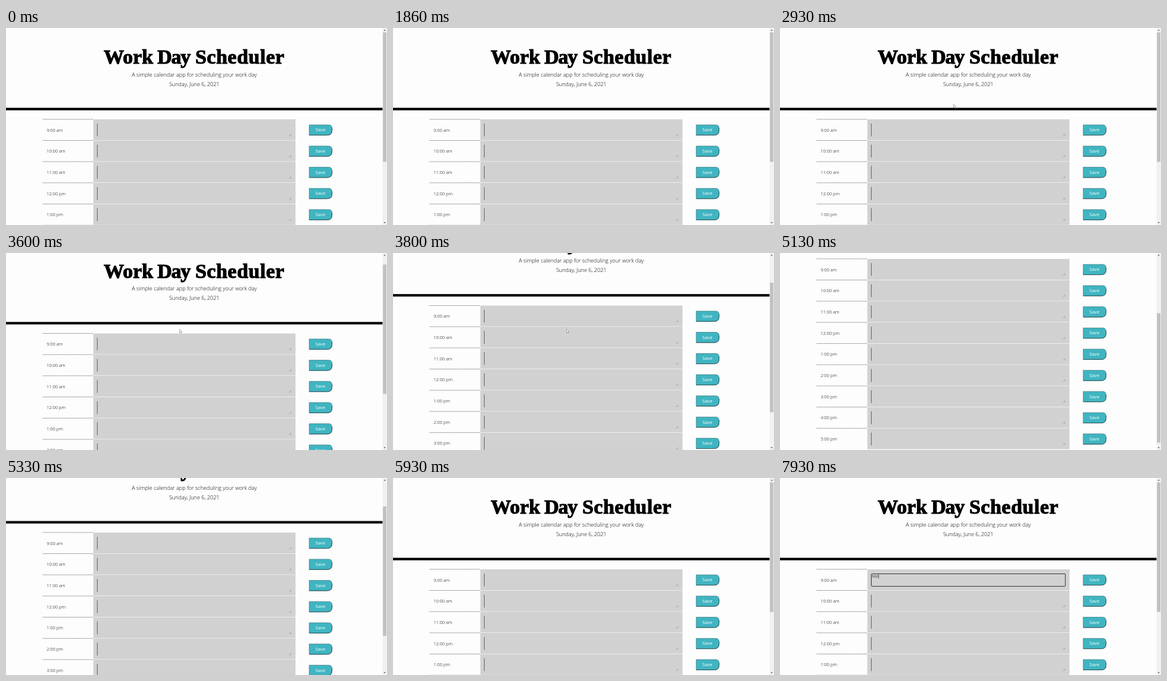
Write an HTML page that moves like this. It is 640 by 332 pixels and loops after 8000 ms.

```html
<!DOCTYPE html>
<html lang="en">
<head>
<meta charset="utf-8">
<title>Work Day Scheduler</title>
<style>
  html, body { margin: 0; width: 100%; height: 100%; overflow: hidden; background: #fdfdfd; }
  svg { display: block; width: 100vw; height: 100vh; }
  text { font-family: "Open Sans", "Noto Sans", sans-serif; font-weight: 300; fill: #000; }
  .title text { font: bold 34px "Liberation Serif", "Times New Roman", serif; stroke: #000; stroke-width: 1.1; text-anchor: middle; }
  .lead { font-size: 9.1px; text-anchor: middle; }
  .hour { font-size: 7.5px; }
  .save { font-size: 7.7px; font-weight: 400; fill: #fff; text-anchor: middle; }
  .typed { font-size: 7.5px; }
</style>
</head>
<body>
<svg viewBox="0 0 640 332" preserveAspectRatio="none">
  <rect width="640" height="332" fill="#fdfdfd"/>
  <g id="page">
    <g class="title">
      <text x="205.7" y="60.3">Work</text>
      <text x="281.7" y="60.3" letter-spacing="-1.3">Day</text>
      <text x="392.9" y="60.3" letter-spacing="0.5">Scheduler</text>
    </g>
    <text class="lead" x="316.4" y="81.8">A simple calendar app for scheduling your work day</text>
    <text class="lead" x="316.2" y="97.8">Sunday, June 6, 2021</text>
    <rect y="134.5" width="633" height="4.2"/>
    <g id="rows"></g>
    <g id="focus">
      <rect x="153" y="161" width="326.8" height="22" fill="#d1d1d1"/>
      <rect x="153.5" y="161.5" width="325.8" height="21" rx="1.2" fill="none" stroke="#333"/>
      <text class="typed" x="154.6" y="168.2"><tspan id="typed"></tspan></text>
      <path id="caret" d="M0 161.8v7.6" stroke="#222" stroke-width=".7"/>
    </g>
  </g>
  <path id="cursor" d="M0 0v6l1.4-1.2 1 2.1 .9-.4-1-2.1h1.9z" fill="#fff" stroke="#777" stroke-width=".6"/>
  <rect x="632.5" width="7.5" height="332" fill="#f1f1f1"/>
  <rect id="thumb" x="633.2" y="7.4" width="5.8" height="218.2" fill="#c1c1c1"/>
  <path d="M634.4 4.6l1.7-2 1.7 2z" fill="#505050"/>
  <path d="M634.4 327.2l1.7 2 1.7-2z" fill="#505050"/>
</svg>
<script>
const LOOP = 8000, PITCH = 35.7, THUMB_RATIO = 0.653;
const $ = id => document.getElementById(id);

const row = (label, i) => `
  <g transform="translate(0 ${(i * PITCH).toFixed(2)})">
    <rect x="146.7" y="153.9" width="339.6" height="35.8" fill="#d1d1d1"/>
    <path d="M146.7 189.5h339.6" stroke="#fdfdfd"/>
    <path d="M61.5 153.8h85" stroke="#666" stroke-width=".8" stroke-dasharray="1.6 .7"/>
    <text class="hour" x="68.2" y="174.5">${label}</text>
    <path d="M153.4 161v21.6" stroke="#444" stroke-width=".8"/>
    <path d="M475.6 182l3.4-3.4M477.6 182l1.4-1.4" stroke="#858585" stroke-width=".7"/>
    <path d="M509.3 163.2h32.6q5.8 0 5.8 5.8v3.6q0 8-8 8h-30.4z" fill="#40b5c1" stroke="#3a727a" stroke-width=".7"/>
    <path d="M547.7 168.5v4.1q0 8-8 8h-30.4" fill="none" stroke="#20454b" stroke-width=".8"/>
    <text class="save" x="528.2" y="174.4">Save</text>
  </g>`;

$("rows").innerHTML = Array.from({ length: 9 }, (_, i) => {
  const hour = 9 + i;
  return row(`${hour > 12 ? hour - 12 : hour}:00 ${hour < 12 ? "am" : "pm"}`, i);
}).join("");

// Each track lists [time, value]; a value holds until the next time.
const scroll = [
  [0, 0],
  [3460, 2], [3530, 8], [3600, 18.3], [3660, 33], [3730, 49],
  [3800, 65.3], [3860, 90], [3930, 115], [4000, 135], [4060, 144],
  [5200, 134], [5260, 103], [5330, 62], [5400, 27], [5460, 7], [5530, 0]
];
const pointer = [
  [0, null],
  [2600, [318, 158]], [2730, [308, 147]], [2800, [299, 137]],
  [2860, [294, 131]], [2930, [291.6, 128.4]],
  [4800, null]
];
const entry = [[0, null], [7600, ""], [7860, "M"], [7930, "Me"]];

const at = (track, time) => track.findLast(([start]) => start <= time)[1];
const show = (el, visible) => el.setAttribute("visibility", visible ? "visible" : "hidden");

function draw(time) {
  const y = at(scroll, time);
  $("page").setAttribute("transform", `translate(0 ${-y})`);
  $("thumb").setAttribute("y", 7.4 + y * THUMB_RATIO);

  const spot = at(pointer, time);
  show($("cursor"), spot);
  if (spot) $("cursor").setAttribute("transform", `translate(${spot})`);

  const text = at(entry, time);
  show($("focus"), text !== null);
  $("typed").textContent = text || "";
  const end = 155 + (text ? $("typed").getComputedTextLength() : 0);
  $("caret").setAttribute("transform", `translate(${end} 0)`);
}

const started = performance.now();
function tick() {
  draw((performance.now() - started) % LOOP);
  requestAnimationFrame(tick);
}
tick();
</script>
</body>
</html>
```
